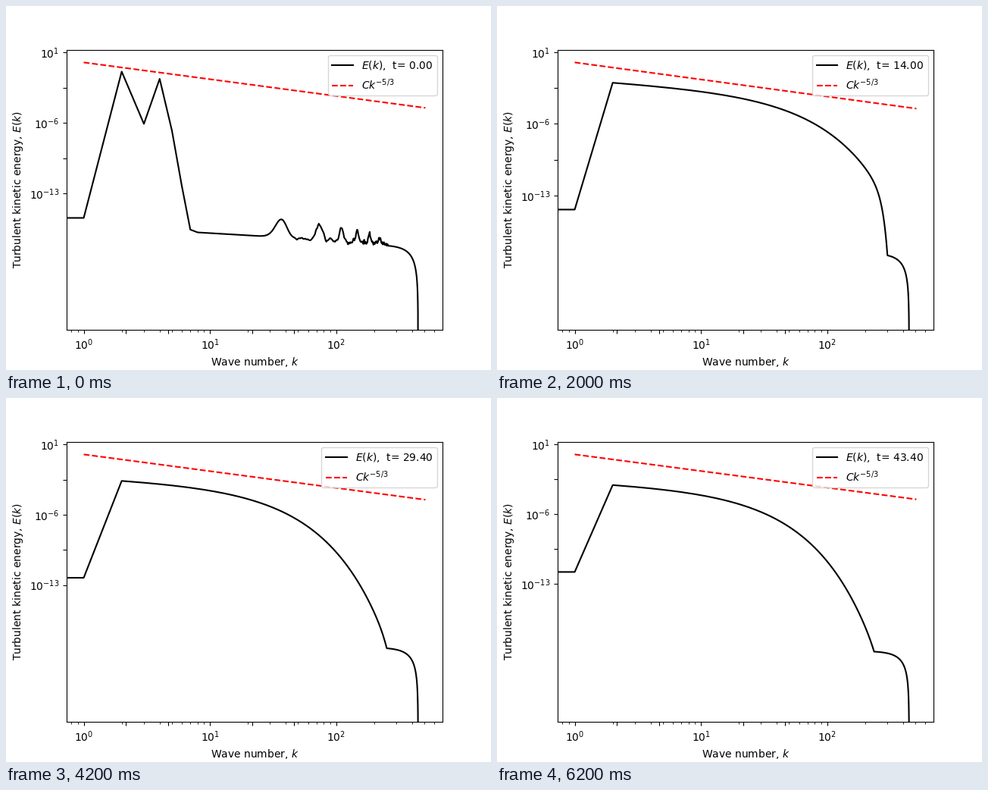
Recreate the animation shown at these times as a matplotlib script. Size 640 px wide and 480 px high, loop 6400 ms.

```python
import numpy as np
import matplotlib.pyplot as plt
from matplotlib.animation import FuncAnimation

FRAMES, INTERVAL, DT = 32, 200, 1.4
K_MAX, K_CUT, K_NOISE = 511, 446, 256
k = np.arange(1, K_MAX + 1)
logk = np.log10(k)

# Quantities that follow the flow: visible decades, depth of k = 1, damping
KEY_T = [0, 5.6, 14, 19.6, 25.2, 33.6, 43.4]
DECADES = [25.3, 24.32, 24.9, 25.02, 25.3, 25.45, 25.6]
FIRST = [15.44, 15.66, 14.38, 13.43, 12.42, 12.15, 11.81]
DAMPING = [3.4, 3.4, 3.5, 5.25, 6.17, 6.2, 6.8]


# A depth is -log10(E).
def initial_depth():
    """Two energetic modes above round-off noise with harmonic bumps."""
    depth = 16.2 + 0.75 * logk
    for n in range(1, 7):
        height = 1.8 - 0.22 * (n - 1)
        depth -= height * np.exp(-0.5 * ((k - 36.8 * n) / 3.8) ** 2)
    noise = np.random.default_rng(4).normal(0, 0.17, k.size)
    depth += np.where(k > 47, np.convolve(noise, [0.25, 0.5, 0.25], "same"), 0)
    depth[1:7] = 0.91, 6.1, 1.63, 6.75, 12.3, 16.6
    return np.where(k <= K_NOISE, depth, 30)


def developed_depth(t):
    """Decaying power law with an exponential dissipation range."""
    level = 0.52 * t ** 0.44
    slope = 0.6 + 2.1 * np.exp(-t / 6)
    damping = np.interp(t, KEY_T, DAMPING)
    cliff = 5 * (k / 300) ** 12
    return level + slope * logk + damping * (k / 100) ** 0.95 + cliff


def tail_depth(t):
    """Round-off floor that plunges at the cutoff."""
    x = np.minimum(k, K_CUT) / (K_CUT + 1)
    return 18.1 + 0.038 * t - 3.5 * np.log10(1 - x ** 5)


INITIAL = initial_depth()


def spectrum(t):
    mix = min(t / KEY_T[1], 1) ** 0.6
    depth = (1 - mix) * INITIAL + mix * developed_depth(t)
    depth = np.minimum(depth, tail_depth(t))
    depth[0] = np.interp(t, KEY_T, FIRST)
    return np.where(k <= K_CUT, 10 ** -depth, 0)


fig, ax = plt.subplots(figsize=(6.4, 4.8), dpi=100)
line, = ax.loglog([], [], "k-")
ax.loglog(k, k ** (-5 / 3), "r--", label="$Ck^{-5/3}$")
ax.set_xlabel("Wave number, $k$")
ax.set_ylabel("Turbulent kinetic energy, $E(k)$")
ax.set_xticks(np.logspace(0, 2, 7))
ax.set_yticks(np.logspace(1, -13, 5))
margin = 0.05 * np.log10(K_MAX)
ax.set_xlim(10 ** -margin, K_MAX * 10 ** margin)


def update(i):
    t = i * DT
    energy = spectrum(t)
    decades = np.interp(t, KEY_T, DECADES)
    line.set_data(np.r_[0.1, k], np.r_[energy[0], energy])
    line.set_label(f"$E(k)$,  t= {t:.2f}")
    ax.set_ylim(10 ** (-1.05 * decades), 10 ** (0.05 * decades))
    ax.legend(loc="upper right")
    return line,


anim = FuncAnimation(fig, update, frames=FRAMES, interval=INTERVAL,
                     init_func=lambda: update(0), repeat=True, repeat_delay=0)
plt.show()
```
